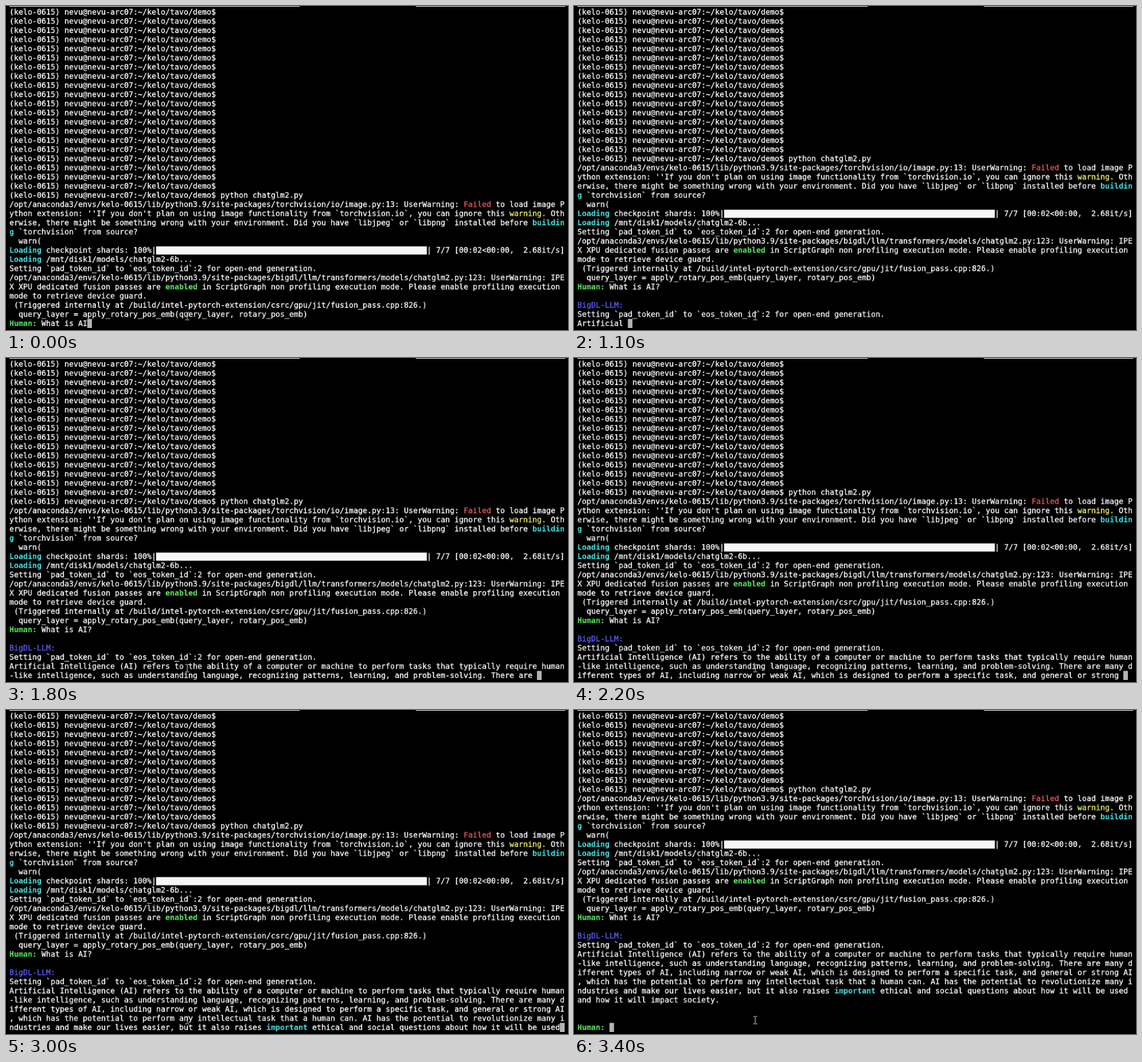
Animation of 831 by 480 pixels, one loop 3450 ms. Source, as an HTML page with a canvas:

```html
<!DOCTYPE html>
<html lang="en">
<head>
<meta charset="utf-8">
<title>Terminal chat</title>
<style>
  html, body { margin: 0; width: 831px; height: 480px; overflow: hidden; background: #000; }
  canvas { display: block; }
</style>
</head>
<body>
<canvas id="stage" width="831" height="480"></canvas>
<script>
const ctx = document.getElementById("stage").getContext("2d");

const LOOP = 3450, STEP = 50;
const COLS = 121, ROWS = 35;
const CELL_W = 18, CELL_H = 36, SCALE = 0.3769;
const LEFT = 5, TOP = 2.2;
const FONT = '29.9px "DejaVu Sans Mono", monospace';
const WHITE = "#f6f6f6";

// The terminal is drawn large on its own canvas, then scaled down onto the stage.
const sheet = document.createElement("canvas");
sheet.width = COLS * CELL_W;
sheet.height = ROWS * CELL_H;
const pen = sheet.getContext("2d");

const STYLES = {
  "Failed": ["#e0525c", false],
  "warning.": ["#f0f066", false],
  "building": ["#45e0e0", true],
  "Loading": ["#45e0e0", true],
  "important": ["#45e0e0", true],
  "enabled": ["#5cee62", true],
  "Human:": ["#5cee62", true],
  "BigDL-LLM:": ["#5c58f6", false]
};
const STYLED = /Failed|warning\.|building|Loading|important|enabled|Human:|BigDL-LLM:/g;

const PROMPT = "(kelo-0615) nevu@nevu-arc07:~/kelo/tavo/demo$";
const PACKAGES = "/opt/anaconda3/envs/kelo-0615/lib/python3.9/site-packages/";
const SETTING = "Setting `pad_token_id` to `eos_token_id`:2 for open-end generation.\n";

const LOG = (PROMPT + "\n").repeat(20) + [
  PROMPT + " python chatglm2.py",
  PACKAGES + "torchvision/io/image.py:13: UserWarning: Failed to load image Python extension: " +
    "''If you don't plan on using image functionality from `torchvision.io`, you can ignore this warning. " +
    "Otherwise, there might be something wrong with your environment. " +
    "Did you have `libjpeg` or `libpng` installed before building `torchvision` from source?",
  "  warn(",
  "Loading checkpoint shards: 100%|" + "█".repeat(59) + "| 7/7 [00:02<00:00,  2.68it/s]",
  "Loading /mnt/disk1/models/chatglm2-6b...",
  SETTING + PACKAGES + "bigdl/llm/transformers/models/chatglm2.py:123: UserWarning: " +
    "IPEX XPU dedicated fusion passes are enabled in ScriptGraph non profiling execution mode. " +
    "Please enable profiling execution mode to retrieve device guard.",
  " (Triggered internally at /build/intel-pytorch-extension/csrc/gpu/jit/fusion_pass.cpp:826.)",
  "  query_layer = apply_rotary_pos_emb(query_layer, rotary_pos_emb)",
  "Human: What is AI"
].join("\n");

const ANSWER = ("Artificial Intelligence (AI) refers to the ability of a computer or machine to perform " +
  "tasks that typically require human-like intelligence, such as understanding language, recognizing " +
  "patterns, learning, and problem-solving. There are many different types of AI, including narrow or " +
  "weak AI, which is designed to perform a specific task, and general or strong AI, which has the " +
  "potential to perform any intellectual task that a human can. AI has the potential to revolutionize " +
  "many industries and make our lives easier, but it also raises important ethical and social questions " +
  "about how it will be used and how it will impact society.").split(" ");

const QUESTION_MARK_AT = 250, ENTER_AT = 700, FIRST_WORD_AT = 1050, NEXT_PROMPT_AT = 3200;
// [time, words streamed so far]
const PACE = [[1100, 1], [1800, 31], [2200, 53], [2600, 73], [3000, 95], [3120, ANSWER.length]];

function wordCount(t) {
  if (t < FIRST_WORD_AT) return 0;
  if (t <= PACE[0][0]) return 1;
  for (let i = 1; i < PACE.length; i++) {
    const [t0, n0] = PACE[i - 1], [t1, n1] = PACE[i];
    if (t <= t1) return Math.floor(n0 + (n1 - n0) * (t - t0) / (t1 - t0) + 1e-6);
  }
  return ANSWER.length;
}

function textAt(t) {
  let text = LOG;
  if (t >= QUESTION_MARK_AT) text += "?";
  if (t >= ENTER_AT) text += "\n\nBigDL-LLM:\n" + SETTING;
  const n = wordCount(t);
  if (n) text += ANSWER.slice(0, n).join(" ") + (n < ANSWER.length ? " " : "");
  if (t >= NEXT_PROMPT_AT) text += "\n\n\nHuman: ";
  return text;
}

// Terminal wrapping: a full row only breaks once another character arrives.
function layout(text) {
  const styles = [];
  for (const m of text.matchAll(STYLED)) {
    styles.length = m.index;
    for (const _ of m[0]) styles.push(STYLES[m[0]]);
  }
  const cells = [];
  let row = 0, col = 0;
  for (let i = 0; i < text.length; i++) {
    if (text[i] === "\n") { row++; col = 0; continue; }
    if (col === COLS) { row++; col = 0; }
    cells.push({ ch: text[i], row, col, style: styles[i] || [WHITE, false] });
    col++;
  }
  return { cells, row, col: Math.min(col, COLS - 1) };
}

function drawTerminal(text) {
  const screen = layout(text);
  const scroll = screen.row - (ROWS - 1);

  pen.fillStyle = "#000";
  pen.fillRect(0, 0, sheet.width, sheet.height);
  pen.fillStyle = "#b4b4b4";
  pen.fillRect(screen.col * CELL_W, (ROWS - 1) * CELL_H, CELL_W, CELL_H);

  pen.lineWidth = 0.8;
  pen.lineJoin = "round";
  for (const { ch, row, col, style: [color, bold] } of screen.cells) {
    if (row < scroll || ch === " ") continue;
    const x = col * CELL_W, y = (row - scroll) * CELL_H;
    pen.fillStyle = pen.strokeStyle = color;
    if (ch === "█") {
      pen.fillRect(x, y + 3, CELL_W, CELL_H - 4);
      continue;
    }
    pen.font = (bold ? "bold " : "") + FONT;
    pen.fillText(ch, x, y + 28);
    if (!bold) pen.strokeText(ch, x, y + 28);
  }
}

function drawPointer() {
  ctx.fillStyle = "#c4c4c4";
  ctx.fillRect(267.5, 454, 1, 11);
  for (const y of [453.5, 464.5]) {
    ctx.fillRect(265, y, 2.5, 1);
    ctx.fillRect(268.5, y, 2.5, 1);
  }
}

function draw(text) {
  drawTerminal(text);
  ctx.fillStyle = "#000";
  ctx.fillRect(0, 0, 831, 480);
  ctx.imageSmoothingQuality = "high";
  ctx.drawImage(sheet, LEFT, TOP, sheet.width * SCALE, sheet.height * SCALE);
  ctx.fillStyle = "#d8d8d8";
  ctx.fillRect(5, 0, 429, 1);
  ctx.fillRect(606, 0, 221, 1);
  drawPointer();
}

let shown = null;
const start = performance.now();

function tick() {
  const elapsed = (performance.now() - start) % LOOP;
  const text = textAt(Math.floor(elapsed / STEP) * STEP);
  if (text !== shown) draw(shown = text);
  requestAnimationFrame(tick);
}
tick();
</script>
</body>
</html>
```
